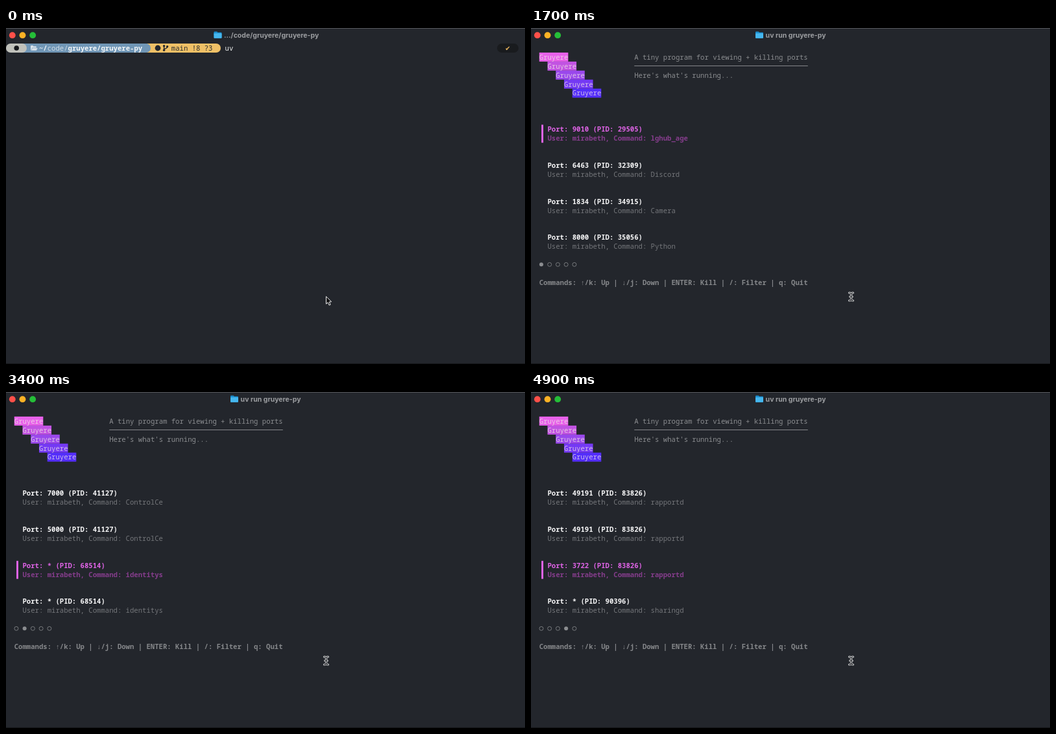
Recreate the animation shown at these times as an HTML page with a canvas. Size 800 by 519 pixels, loop 5 s.

```html
<!DOCTYPE html>
<html lang="en">
<head>
<meta charset="utf-8">
<title>Terminal</title>
<style>
html, body { margin: 0; width: 100%; height: 100%; overflow: hidden; background: #23262c; }
canvas { display: block; width: 800px; height: 519px; }
</style>
</head>
<body>
<canvas id="stage"></canvas>
<script>
const W = 800, H = 519, LOOP = 5000, STEP = 100;
const CELL = 6.37, ROW = 13.93;
const MONO = '"Noto Sans Mono", "DejaVu Sans Mono", monospace';
const SIZE = 10.62;
const BG = '#23262c', GRAY = '#8b8d90', DIM = '#74767a', PINK = '#de63e5', PLUM = '#853d8c';

const canvas = document.getElementById('stage');
const ctx = canvas.getContext('2d');
const dpr = window.devicePixelRatio || 1;
canvas.width = W * dpr;
canvas.height = H * dpr;

const USER = 'mirabeth';
const COMMAND = 'uv run gruyere-py';
const SHADES = ['#e861ea', '#c253e2', '#9a48ec', '#7439f4', '#542efb'];
const PORTS = [
  ['9010', 29505, 'lghub_age'], ['6463', 32309, 'Discord'],
  ['1834', 34915, 'Camera'], ['8000', 35056, 'Python'],
  ['7000', 41127, 'ControlCe'], ['5000', 41127, 'ControlCe'],
  ['*', 68514, 'identitys'], ['*', 68514, 'identitys'],
  ['*', 68514, 'identitys'], ['*', 68514, 'identitys'],
  ['28196', 78039, 'Stream'], ['28198', 78039, 'Stream'],
  ['49191', 83826, 'rapportd'], ['49191', 83826, 'rapportd'],
  ['3722', 83826, 'rapportd'], ['*', 90396, 'sharingd'],
  ['53699', 90396, 'sharingd']
];

const colX = col => col * CELL;
const rowY = row => 31 + row * ROW;

function text(str, col, row, color, weight = 400) {
  ctx.font = `${weight} ${SIZE}px ${MONO}`;
  ctx.fillStyle = color;
  ctx.fillText(str, colX(col), rowY(row) + 3.8);
}

function rect(x, y, w, h, color) {
  ctx.fillStyle = color;
  ctx.fillRect(x, y, w, h);
}

function pill(x, y, w, h, radii, color) {
  ctx.fillStyle = color;
  ctx.beginPath();
  ctx.roundRect(x, y, w, h, radii);
  ctx.fill();
}

function dot(x, y, r, color, hollow) {
  ctx.beginPath();
  ctx.arc(x, y, r, 0, 7);
  if (hollow) {
    ctx.strokeStyle = color;
    ctx.lineWidth = 0.8;
    ctx.stroke();
  } else {
    ctx.fillStyle = color;
    ctx.fill();
  }
}

function windowBar(title, x) {
  rect(0, 0, W, H, BG);
  rect(0, 0, W, 1, '#55575b');
  rect(0, H - 1, W, 1, '#15171a');
  ['#fe5049', '#fdb225', '#25be38'].forEach((c, i) => dot(9.8 + i * 15.7, 11.2, 4.9, c));

  pill(x, 5.5, 5.5, 5, 1, '#1b8fd0');
  pill(x, 6.8, 12, 9, 1, '#1b8fd0');
  pill(x, 8.3, 12, 7.5, 1, '#46b7ee');

  ctx.font = '700 10.5px Inter, "Open Sans", sans-serif';
  ctx.fillStyle = '#9b9da0';
  ctx.fillText(title, x + 15.6, 14.7);
}

function folder(x, y) {
  ctx.fillStyle = '#d9e2ea';
  ctx.beginPath();
  ctx.roundRect(x, y, 4, 3, 0.8);
  ctx.roundRect(x, y + 1.3, 8.8, 6.7, 0.8);
  ctx.fill();
  ctx.beginPath();
  ctx.moveTo(x + 0.4, y + 8);
  ctx.lineTo(x + 2.7, y + 3.8);
  ctx.lineTo(x + 11.2, y + 3.8);
  ctx.lineTo(x + 9, y + 8);
  ctx.closePath();
  ctx.fill();
  ctx.strokeStyle = '#7096b6';
  ctx.lineWidth = 0.6;
  ctx.stroke();
}

function branch(x, y) {
  const ink = '#23262c';
  ctx.strokeStyle = ink;
  ctx.lineWidth = 1.4;
  ctx.beginPath();
  ctx.moveTo(x, y - 3);
  ctx.lineTo(x, y + 3);
  ctx.moveTo(x + 5, y - 2);
  ctx.quadraticCurveTo(x + 5, y + 0.6, x, y + 1.4);
  ctx.stroke();
  dot(x, y - 3.2, 1.7, ink);
  dot(x, y + 3.2, 1.7, ink);
  dot(x + 5, y - 2.3, 1.7, ink);
}

function prompt(typed, waiting) {
  pill(217, 24, 114, 14, [0, 7, 7, 0], '#efc066');
  pill(22, 24, 201, 14, [0, 7, 7, 0], '#7096b6');
  pill(0, 24, 32, 14, 7, '#c0c1bb');
  dot(16.2, 31, 3.8, '#15171a');

  folder(38, 27);
  text('~/', 8, 0, '#f1f5f8', 700);
  text('code/', 10, 0, '#cfdbe5');
  text('gruyere/gruyere-py', 15, 0, '#f4f7f9', 700);

  dot(234, 31, 4.4, '#23262c');
  branch(243.6, 31);
  text('main !8 ?3', 40, 0, '#292b2d');
  text(typed, 53, 0, '#eceded');

  pill(757, 24, 33, 14, 7, '#191b1e');
  ctx.font = '10px "DejaVu Sans", sans-serif';
  ctx.fillStyle = '#e9b45c';
  ctx.fillText('✔', 769.3, 34.6);

  if (waiting) rect(0, 38, CELL, 14, '#ffffff');
}

function header() {
  SHADES.forEach((shade, i) => {
    rect(colX(2 + 2 * i), rowY(1 + i) - 7, 7 * CELL, ROW, shade);
    text('Gruyere', 2 + 2 * i, 1 + i, 'rgba(240,228,228,.78)');
  });
  text('A tiny program for viewing + killing ports', 25, 1, GRAY);
  rect(colX(25), 58, 42 * CELL, 1, '#85878a');
  text("Here's what's running...", 25, 3, GRAY);
}

function portList(index) {
  const page = Math.floor(index / 4);
  const first = Math.min(page * 4, PORTS.length - 4);
  for (let i = 0; i < 4; i++) {
    const [port, pid, command] = PORTS[first + i];
    const row = 9 + i * 4, active = first + i === index;
    if (active) rect(16, rowY(row) - 7, 3, 2 * ROW, PINK);
    text(`Port: ${port} (PID: ${pid})`, 4, row, active ? PINK : '#f7f7f8', 700);
    text(`User: ${USER}, Command: ${command}`, 4, row + 1, active ? PLUM : DIM, active ? 600 : 400);
  }
  // The last page wraps back to the first marker.
  const mark = page % 4;
  for (let i = 0; i < 5; i++) dot(15.9 + i * 2 * CELL, rowY(24), 3, GRAY, i !== mark);
  text('Commands: ↑/k: Up | ↓/j: Down | ENTER: Kill | /: Filter | q: Quit', 2, 26, '#85878a', 600);
}

function arrow(x, y) {
  ctx.beginPath();
  [[0, 0], [0, 11.5], [2.6, 9.2], [4.6, 13.5], [6.6, 12.6], [4.7, 8.4], [8.1, 8.1]]
    .forEach(([dx, dy]) => ctx.lineTo(x + dx, y + dy));
  ctx.closePath();
  ctx.fillStyle = '#0c0d0f';
  ctx.fill();
  ctx.strokeStyle = '#f2f2f2';
  ctx.lineWidth = 1;
  ctx.stroke();
}

function iBeam(x, y) {
  ctx.beginPath();
  ctx.moveTo(x - 3, y - 6);
  ctx.quadraticCurveTo(x, y - 6, x, y - 4);
  ctx.quadraticCurveTo(x, y - 6, x + 3, y - 6);
  ctx.moveTo(x, y - 4);
  ctx.lineTo(x, y + 4);
  ctx.moveTo(x - 3, y + 6);
  ctx.quadraticCurveTo(x, y + 6, x, y + 4);
  ctx.quadraticCurveTo(x, y + 6, x + 3, y + 6);
  ctx.moveTo(x - 1.8, y);
  ctx.lineTo(x + 1.8, y);
  ctx.lineCap = 'round';
  for (const [width, color] of [[3, '#d8d9da'], [1.1, '#1a1c20']]) {
    ctx.lineWidth = width;
    ctx.strokeStyle = color;
    ctx.stroke();
  }
  ctx.lineCap = 'butt';
}

// Two taps, a held key repeating every 85 ms, then two steps back.
function selectedAt(t) {
  if (t < 2500) return 0;
  if (t < 2900) return 1;
  if (t >= 4800) return 14;
  if (t >= 4600) return 15;
  return Math.min(16, 2 + Math.max(0, Math.floor((t - 3000) / 85)));
}

function draw(t) {
  ctx.setTransform(dpr, 0, 0, dpr, 0, 0);
  const running = t >= 1000;
  if (running) windowBar(COMMAND, 346);
  else windowBar('.../code/gruyere/gruyere-py', 320.5);

  if (t < 1300) {
    const typed = 2 + Math.round(Math.min(1, t / 600) * (COMMAND.length - 2));
    prompt(COMMAND.slice(0, typed), running);
  } else {
    header();
    portList(selectedAt(t));
  }

  if (running) iBeam(493.5, 415);
  else arrow(493.5, 414.7);
}

const start = performance.now();
function tick() {
  const t = (performance.now() - start) % LOOP;
  draw(Math.floor(t / STEP) * STEP);
  requestAnimationFrame(tick);
}
tick();
</script>
</body>
</html>
```
